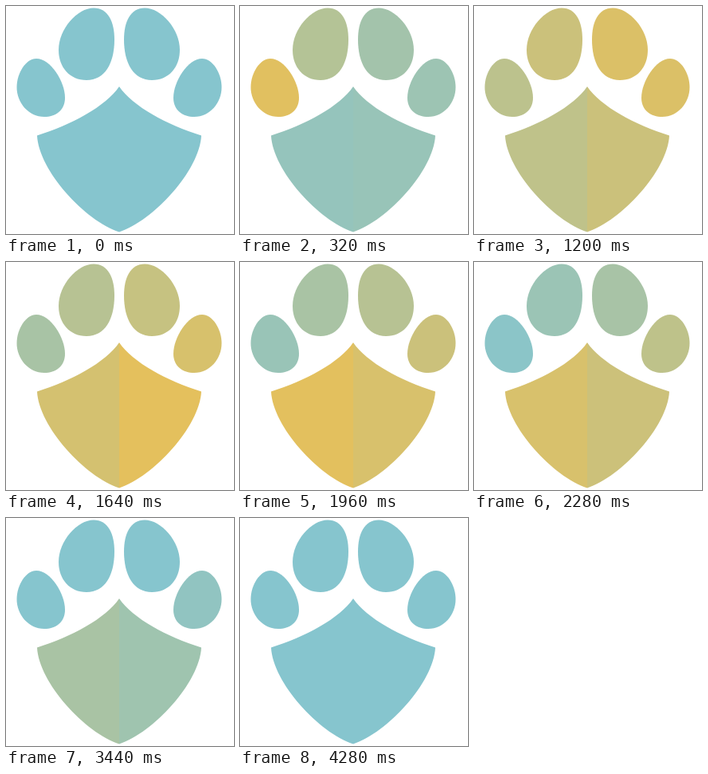
An HTML page for the animation above (4.32 s loop, 286 by 286 pixels).

```html
<!DOCTYPE html>
<html lang="en">
<head>
<meta charset="utf-8">
<title>Paw shield</title>
<style>
  html, body { margin: 0; width: 100%; height: 100%; overflow: hidden; background: #fff; }
  svg { display: block; width: 100vw; height: 100vh; }
</style>
</head>
<body>
<svg viewBox="0 0 286 286">
  <defs>
    <path id="outer" d="M38 66C56 66 74 95 74 115C74 131 62 139 48 139C28 139 13.500 121 13.500 102C13.500 84 25 66 38 66Z"/>
    <path id="inner" d="M110 2.500C128 2.500 136 20 136 42C136 72 124 93 101 93C80 93 66 77 66 55C66 29 89.500 2.500 110 2.500Z"/>
    <path id="half" d="M142 101C125 126 82 149 39 162.500C41 206 99 269.500 142 283.500Z"/>
  </defs>
  <use class="part" href="#outer"/>
  <use class="part" href="#inner"/>
  <use class="part" href="#inner" transform="matrix(-1 0 0 1 284 0)"/>
  <use class="part" href="#outer" transform="matrix(-1 0 0 1 284 0)"/>
  <use class="part" href="#half" transform="matrix(-1 0 0 1 284 0)"/>
  <use class="part" href="#half"/>
</svg>
<script>
  const LOOP = 4320, STEP = 40;
  const TEAL = [134, 197, 206], GOLD = [228, 192, 93];

  // Time of full gold and of the return to teal, in ms
  const times = [[330, 2380], [650, 2740], [1020, 2980], [1320, 3710], [1640, 4110], [1980, 4290]];
  const parts = document.querySelectorAll('.part');

  const mix = k => `rgb(${TEAL.map((c, i) => Math.round(c + (GOLD[i] - c) * k))})`;
  const level = (t, [peak, end]) =>
    t < peak ? t / peak : Math.max(0, (end - t) / (end - peak));

  const start = performance.now();
  function draw() {
    const now = Math.max(0, performance.now() - start) % LOOP;
    const t = Math.floor(now / STEP) * STEP;
    parts.forEach((part, i) => part.setAttribute('fill', mix(level(t, times[i]))));
    requestAnimationFrame(draw);
  }
  draw();
</script>
</body>
</html>
```
